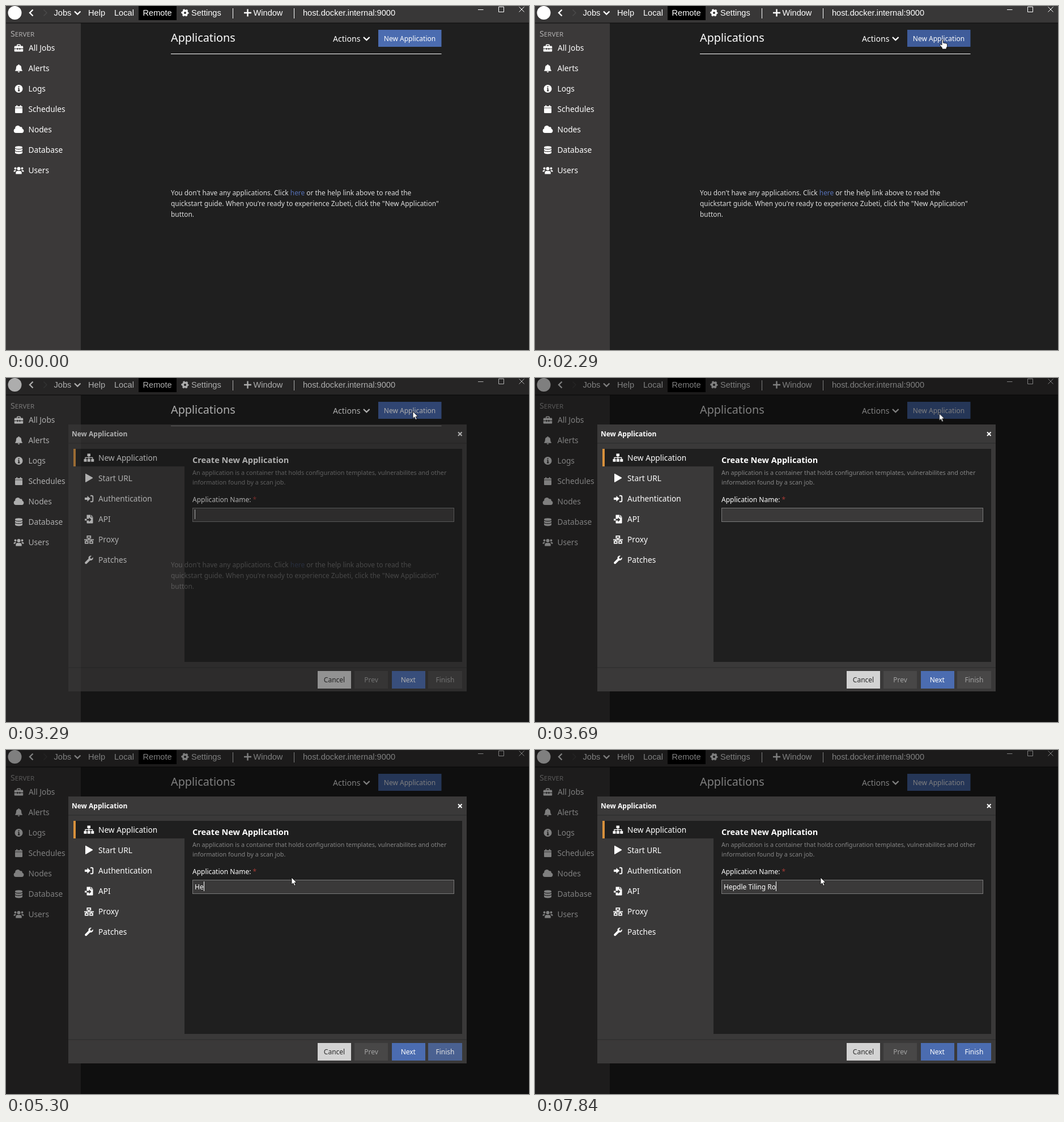
An HTML page that plays this animation: 923 px wide and 607 px high, repeating every 8000 ms.

```html
<!DOCTYPE html>
<html lang="en">
<head>
<meta charset="utf-8">
<title>New application</title>
<style>
  html, body { margin: 0; width: 100%; height: 100%; overflow: hidden; background: #1f1f1f; }
  svg { display: block; width: 100vw; height: 100vh; }
  text { font: 13.7px "Noto Sans", "Open Sans", sans-serif; fill: #fff; white-space: pre; }
  .bar text { font: 14.6px "Liberation Sans", Arial, sans-serif; }
  .line { fill: none; stroke: #fff; stroke-width: 1; }
  .thick { fill: none; stroke: #fff; stroke-width: 2.4; }
  .icon { fill: #fff; }
  .cut { fill: none; stroke: #3b3939; stroke-width: 1.2; }
  .small text, text.small { font-size: 12px; }
  .mid { text-anchor: middle; }
  .soft text { fill: #ddd; font-size: 11.88px; }
  text.hint { font-size: 10.8px; fill: #858585; }
  text.bold { font-weight: 600; }

  #hover { animation: hover 8s linear infinite; }
  #shade { animation: shade 8s step-end infinite; }
  #modal { animation: modal 8s step-end infinite; }
  #caret { animation: caret 8s step-end infinite; }
  #finish { animation: finish 8s linear infinite; }
  #finishText { animation: finishText 8s linear infinite; }
  #cursor { animation: move 8s linear infinite; }
  #arrow { animation: arrow 8s step-end infinite; }
  #hand { animation: hand 8s step-end infinite; }
  #beam { animation: beam 8s step-end infinite; }
  #click { animation: click 8s step-end infinite; }

  @keyframes hover {
    0%, 14.4% { fill: #4b6cb0; }
    16.25%, 39.5% { fill: #3f5c9a; }
    42%, 100% { fill: #4b6cb0; }
  }
  @keyframes shade {
    0% { opacity: 0; }
    39.5% { opacity: .03; }
    40.25% { opacity: .17; }
    41.125% { opacity: .32; }
    42%, 100% { opacity: .5; }
  }
  @keyframes modal {
    0% { opacity: 0; }
    39.5% { opacity: .07; }
    40.25% { opacity: .34; }
    41.125% { opacity: .66; }
    42%, 100% { opacity: 1; }
  }
  @keyframes caret {
    0% { opacity: 1; }
    46.125% { opacity: 0; }
    52.625% { opacity: 1; }
    59.625% { opacity: 0; }
    64.625%, 100% { opacity: 1; }
  }
  @keyframes finish {
    0%, 64.3% { fill: #484747; }
    67.1%, 100% { fill: #4b6cb0; }
  }
  @keyframes finishText {
    0%, 64.3% { fill: #a3a3a3; }
    67.1%, 100% { fill: #fff; }
  }
  @keyframes move {
    0%, 7.2% { transform: translate(890px, 605px); animation-timing-function: cubic-bezier(.3, .2, .4, 1); }
    16.25%, 45.8% { transform: translate(718px, 59px); animation-timing-function: cubic-bezier(.35, .1, .5, 1); }
    52.625% { transform: translate(489.5px, 239px); animation-timing-function: step-end; }
    56.25% { transform: translate(504px, 228.5px); animation-timing-function: step-end; }
    57.125%, 100% { transform: translate(504px, 225px); }
  }
  @keyframes arrow {
    0% { opacity: 0; }
    7.625% { opacity: 1; }
    14.4% { opacity: 0; }
    39.5% { opacity: 1; }
    50.8% { opacity: 0; }
    56.25%, 100% { opacity: 1; }
  }
  @keyframes hand {
    0% { opacity: 0; }
    14.4% { opacity: 1; }
    39.5%, 100% { opacity: 0; }
  }
  @keyframes beam {
    0% { opacity: 0; }
    50.8% { opacity: 1; }
    56.25%, 100% { opacity: 0; }
  }
  @keyframes click {
    0% { opacity: 0; }
    27% { opacity: .75; }
    28.625% { opacity: 0; }
    55.375% { opacity: .75; }
    57.125%, 100% { opacity: 0; }
  }
</style>
</head>
<body>
<svg viewBox="0 0 923 607" preserveAspectRatio="none">
  <rect width="923" height="607" fill="#1f1f1f"/>
  <rect y="30" width="132" height="577" fill="#3b3939"/>
  <rect width="923" height="30" fill="#383737"/>
  <rect y="29.5" width="923" height="1" fill="#0c0c0c"/>

  <g class="bar">
    <circle cx="15.5" cy="12" r="12" fill="#fff"/>
    <path class="thick" d="M47.5 6.5 42 12l5.5 5.5"/>
    <path class="thick" style="stroke:#4a4949;stroke-width:1.5" d="M66.5 6.5 72 12l-5.5 5.5"/>
    <text x="84.5" y="17">Jobs</text>
    <path class="thick" d="M121 9.5l5.2 5 5.2-5"/>
    <text x="145" y="17">Help</text>
    <text x="191" y="17">Local</text>
    <rect x="234" width="67" height="25"/>
    <text x="241.5" y="17">Remote</text>
    <g transform="translate(316 12)" fill="none" stroke="#fff">
      <circle r="3.7" stroke-width="3.4"/>
      <circle r="5.7" stroke-width="2" stroke-dasharray="3 2.969" stroke-dashoffset="1.5"/>
    </g>
    <text x="327" y="17">Settings</text>
    <path class="line" d="M400.5 4v18M508.5 4v18"/>
    <path class="thick" d="M420 12h13M426.5 5.5v13"/>
    <text x="436.5" y="17">Window</text>
    <text x="524" y="17">host.docker.internal:9000</text>
    <path class="line" d="M833 6.5h9.5M869.5 1.5h9v9h-9zM905.5 1.5l9 9M914.5 1.5l-9 9"/>
  </g>

  <text x="8" y="54" style="fill:#b3b2b2;font-size:14.3px">S<tspan style="font-size:11.6px">ERVER</tspan></text>
  <text x="40" y="79">All Jobs</text>
  <text x="39.5" y="115">Alerts</text>
  <text x="39.5" y="151">Logs</text>
  <text x="39.5" y="187">Schedules</text>
  <text x="39.5" y="223">Nodes</text>
  <text x="39.5" y="259">Database</text>
  <text x="39.5" y="295">Users</text>
  <g class="icon">
    <path d="M16 70.5h3V69q0-1.5 1.5-1.5h4Q26 67.5 26 69v1.5h3q1.2 0 1.2 1.5v3h-5v-1h-1.5v1h-2.5v-1h-1.5v1h-5v-3q0-1.5 1.3-1.5zM20.5 70.5h4V69h-4zM14.7 76h5v1.2h1.5V76h2.5v1.2h1.5V76h5v3.5q0 1-1 1H15.7q-1 0-1-1z"/>
    <path d="M22.5 103q1 0 1 1.2 3.6.8 3.6 4.5 0 3.3 1.6 4.7.6 1.2-.6 1.3H17q-1.3-.1-.7-1.3 1.6-1.4 1.6-4.7 0-3.7 3.6-4.5 0-1.2 1-1.2zM20.6 115.5h3.8q-.2 1.7-1.9 1.7t-1.9-1.7z"/>
    <circle cx="22.5" cy="146" r="7"/>
    <path d="M18.5 175h1.6v1.8h4.8V175h1.6v1.8h1.2q1.3 0 1.3 1.3v1.3H16v-1.3q0-1.3 1.3-1.3h1.2zM16 180.3h13v7.5q0 1.2-1.2 1.2H17.2q-1.2 0-1.2-1.2z"/>
    <path d="M17.5 224a4 4 0 0 1-1.3-7.7 4.8 4.8 0 0 1 9-2.8 2.8 2.8 0 0 1 3.6 3.3 3.7 3.7 0 0 1-.8 7.2z"/>
    <path d="M16 249.5q0-2.3 6.5-2.3t6.5 2.3v9.3q0 2.4-6.5 2.4t-6.5-2.4z"/>
    <circle cx="16.5" cy="286.5" r="1.9"/><circle cx="28.5" cy="286.5" r="1.9"/><circle cx="22.5" cy="287" r="3"/>
    <path d="M13.5 292q0-2.6 2.3-2.6h2.3q-1.6 1.2-1.9 3.1h-2.7zM31.5 292q0-2.6-2.3-2.6h-2.3q1.6 1.2 1.9 3.1h2.7zM17.3 296.5v-2q0-3.5 3-3.5h4.4q3 0 3 3.5v2z"/>
  </g>
  <path class="cut" d="M16 251q1 1.6 6.5 1.6t6.5-1.6M16 255.3q1 1.6 6.5 1.6t6.5-1.6"/>
  <path class="cut" style="stroke-width:1.8" d="M22.7 145v4.5M21 149.5h3.4M21.3 145.3h1.5M22.6 141.4v2"/>

  <text x="291" y="63" style="font-size:19.8px">Applications</text>
  <text x="577" y="63" style="font-size:14.1px">Actions</text>
  <path class="thick" d="M631 55l5.3 5 5.3-5"/>
  <rect id="hover" x="657" y="42" width="111.5" height="30" fill="#4b6cb0"/>
  <text class="small mid" x="712.5" y="62">New Application</text>
  <path class="line" d="M291 84.5h477.5"/>
  <g class="soft">
    <text x="291" y="334">You don't have any applications. Click <tspan fill="#5570b5">here</tspan> or the help link above to read the</text>
    <text x="291" y="353">quickstart guide. When you're ready to experience Zubeti, click the "New Application"</text>
    <text x="291" y="372">button.</text>
  </g>

  <rect id="shade" width="923" height="607" opacity="0"/>

  <g id="modal" opacity="0">
    <rect x="110" y="82" width="703" height="471" fill="#3a3939"/>
    <path d="M110 115h703M110 511h703" stroke="#2b2b2b"/>
    <text class="small bold" x="116" y="103">New Application</text>
    <path class="thick" style="stroke-width:2" d="M798 95.5l6.5 6.5M804.5 95.5l-6.5 6.5"/>
    <rect x="315" y="125" width="490" height="376" fill="#1f1f1f"/>
    <rect x="119" y="125" width="197" height="31" fill="#1f1f1f"/>
    <rect x="119" y="125" width="4" height="31" fill="#d8913c"/>
    <text x="163" y="146">New Application</text>
    <text x="163" y="182">Start URL</text>
    <text x="163" y="218">Authentication</text>
    <text x="163" y="254">API</text>
    <text x="163" y="290">Proxy</text>
    <text x="163" y="326">Patches</text>
    <g class="icon">
      <path d="M143.5 133.5h5.5v4.5h-5.5zM137.5 143h5v4.8h-5zM143.8 143h5v4.8h-5zM150.2 143h5v4.8h-5z"/>
      <path class="line" style="stroke-width:1.3" d="M146.3 138v5M140 143v-2.5h12.7v2.5"/>
      <path d="M140 169.5q0-1.2 1.2-.6l11.5 6.6q1.1.8 0 1.6l-11.5 6.6q-1.2.6-1.2-.6z"/>
      <path d="M139 211h4.5v-3l5.5 5-5.5 5v-3H139z"/>
      <path class="thick" style="stroke-width:1.9" d="M149 207.7h2.5q1.8 0 1.8 1.8v7q0 1.8-1.8 1.8H149"/>
      <path d="M142.5 241.5h6.5v4h4.5v10q0 1-1 1h-9q-1 0-1-1v-4h4v2.5l4-4-4-4v2.5h-4zM150 241.5l3.5 3.2H150zM139 248.5h3.5v3H139z"/>
      <path class="line" style="stroke-width:1.7" d="M143.3 278.8h6v3.7h-6zM139.8 288h5v3.7h-5zM148 288h5v3.7h-5zM146.3 282.5v2.7M138 285.3h17M142.3 285.3v2.7M150.5 285.3v2.7"/>
      <path d="M139.5 325l6.2-6.2q-.8-3 1.5-4.6 1.7-1.2 3.8-.5l-2.6 2.6.4 2.2 2.2.4 2.6-2.6q.6 2.4-.9 4.2-1.8 1.9-4.3 1.2l-6 6q-1.4 1-2.7-.1-1.1-1.3-.2-2.6z"/>
    </g>

    <text class="bold" x="329" y="150" style="font-size:14.5px">Create New Application</text>
    <text class="hint" x="329" y="171">An application is a container that holds configuration templates, vulnerabilites and other</text>
    <text class="hint" x="329" y="188">information found by a scan job.</text>
    <text class="small" x="329" y="219">Application Name: <tspan fill="#a63a35">*</tspan></text>
    <rect x="329.5" y="229.5" width="461" height="24" fill="#3a3939" stroke="#7a7a7a"/>
    <text class="small" id="typed" x="333" y="245.5"></text>
    <rect id="caret" x="333" y="232" width="1" height="17" fill="#fff"/>

    <rect x="550" y="517" width="59" height="31" fill="#d3d3d3"/>
    <rect x="615" y="517" width="59" height="31" fill="#484747"/>
    <rect x="681" y="517" width="59" height="31" fill="#4b6cb0"/>
    <rect id="finish" x="745" y="517" width="60" height="31" fill="#484747"/>
    <g class="small mid">
      <text x="579.5" y="537" style="fill:#2b2b2b">Cancel</text>
      <text x="644.5" y="537" style="fill:#a3a3a3">Prev</text>
      <text x="709.8" y="537">Next</text>
      <text id="finishText" x="775" y="537">Finish</text>
    </g>
  </g>

  <g id="cursor">
    <circle id="click" cx="-.5" r="9.7" fill="#d6cf10" opacity="0"/>
    <path id="arrow" opacity="0" fill="#fff" stroke="#000" stroke-width=".8" d="M0 0v12.5l2.9-2.7 2 4.7 2.2-.9-2-4.6h4z"/>
    <path id="hand" opacity="0" fill="#fff" stroke="#000" stroke-width=".8" d="M0 1q1.3-1.3 2.5 0v5l5.5 1q1.5.4 1.5 2v3.5l-1.5 2.5v2H.5v-2l-4-5q-.3-2 1.5-1.5L0 10z"/>
    <path id="beam" opacity="0" fill="none" stroke="#fff" d="M-2.5-6.5h2l.5.5.5-.5h2M0-6v12M-2.5 6.5h2l.5-.5.5.5h2"/>
  </g>
</svg>
<script>
  const LOOP = 8000;
  const phrase = "Hepdle Tiling Ro";
  const keys = [5170, 5300, 5500, 5640, 5840, 5980, 6180, 6380,
                6580, 6710, 6840, 7040, 7170, 7300, 7650, 7840];
  const typed = document.getElementById("typed");
  const caret = document.getElementById("caret");
  const start = performance.now();
  let shown = -1;

  function draw() {
    const t = (performance.now() - start) % LOOP;
    const count = keys.filter(k => k <= t).length;
    if (count !== shown) {
      shown = count;
      typed.textContent = phrase.slice(0, count);
      caret.setAttribute("x", 333 + Math.round(count ? typed.getComputedTextLength() : 0));
    }
    requestAnimationFrame(draw);
  }
  draw();
</script>
</body>
</html>
```
